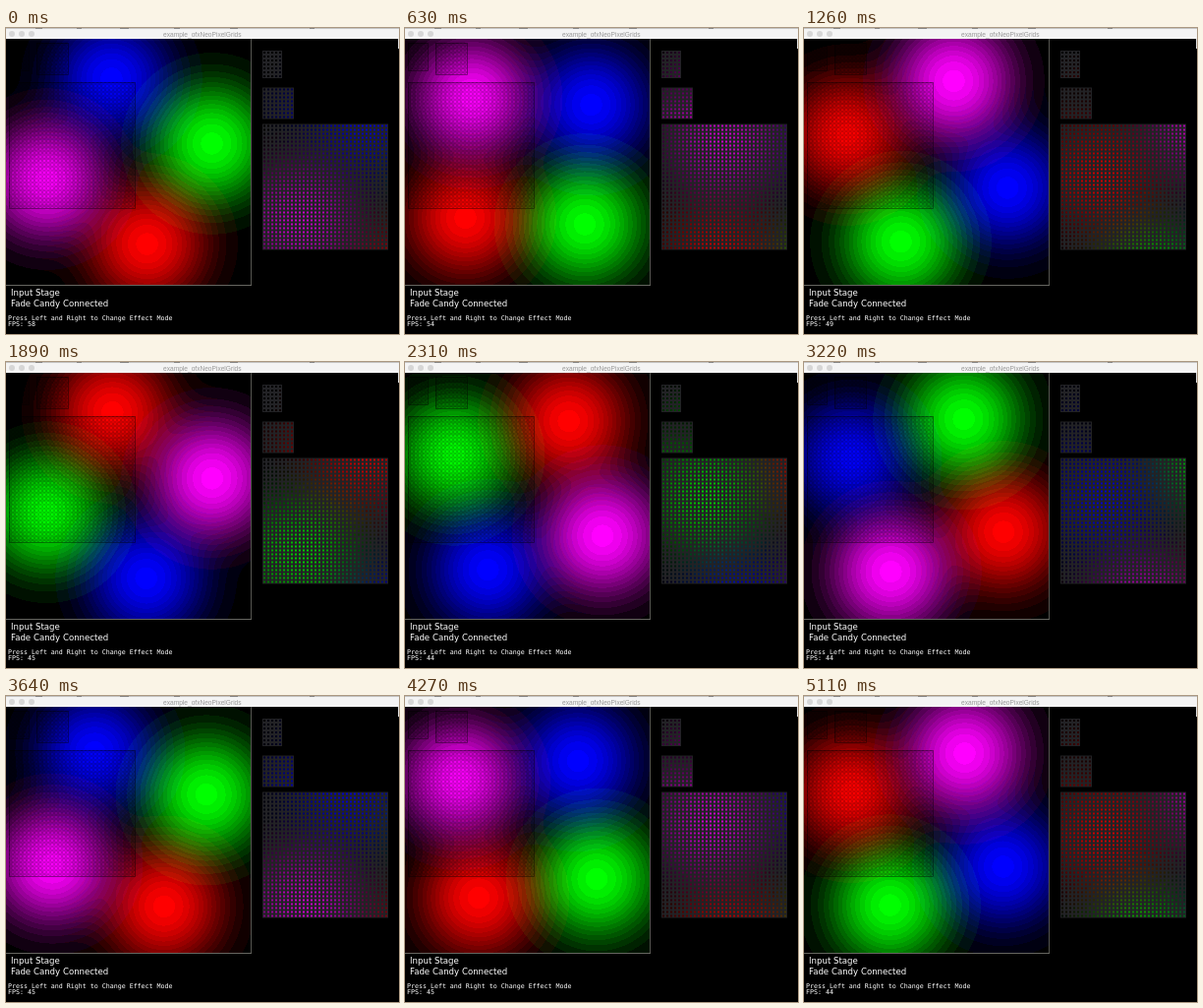
An HTML page with a canvas that plays this animation: 400 by 311 pixels, repeating every 5.18 s.

```html
<!DOCTYPE html>
<html lang="en">
<head>
<meta charset="utf-8">
<title>example_ofxNeoPixelGrids</title>
<style>
  html, body { margin: 0; width: 100%; height: 100%; overflow: hidden; background: #000; }
  canvas { display: block; }
</style>
</head>
<body>
<canvas id="view" width="400" height="311"></canvas>
<script>
const ctx = document.getElementById('view').getContext('2d');
const LOOP = 5180, STEP = 70;
const SIZE = 250, TOP = 11, CELL = 4;
const ORBIT = 86, REACH = 122, SPEED = 1.668, START = -0.212;
const LEVEL = 17;

// Colours in clockwise order, a quarter turn apart
const COLORS = [[0, 1, 0], [1, 0, 0], [1, 0, 1], [0, 0, 1]];

// Each grid samples the stage at (x, y) and is shown again at (px, py)
const GRIDS = [
  { x: 3, y: 15, px: 261, py: 23, cols: 5, rows: 7 },
  { x: 31, y: 15, px: 261, py: 60.5, cols: 8, rows: 8 },
  { x: 3, y: 55, px: 261, py: 97.5, cols: 32, rows: 32 }
];

const stage = ctx.createImageData(SIZE, SIZE);

function blobsAt(time) {
  return COLORS.map((color, i) => {
    const angle = START + SPEED * time / 1000 + i * Math.PI / 2;
    return { color, x: 125 + ORBIT * Math.cos(angle), y: 124 + ORBIT * Math.sin(angle) };
  });
}

// Coarse levels give the visible rings
const quantize = dark => Math.round((1 - dark) * 255 / LEVEL) * LEVEL;

function drawStage(time) {
  const blobs = blobsAt(time);
  const data = stage.data;
  for (let y = 0, p = 0; y < SIZE; y++) {
    for (let x = 0; x < SIZE; x++, p += 4) {
      let r = 1, g = 1, b = 1;
      for (const blob of blobs) {
        const d2 = (x - blob.x) ** 2 + (y - blob.y) ** 2;
        const glow = Math.max(0, 1 - d2 / (REACH * REACH)) ** 4;
        r *= 1 - blob.color[0] * glow;
        g *= 1 - blob.color[1] * glow;
        b *= 1 - blob.color[2] * glow;
      }
      data[p] = quantize(r);
      data[p + 1] = quantize(g);
      data[p + 2] = quantize(b);
      data[p + 3] = 255;
    }
  }
  ctx.putImageData(stage, 0, TOP);
  rect(249, TOP, 1, SIZE, '#555550');
  rect(0, 261, SIZE, 1, '#666660');
}

function rect(x, y, w, h, color) {
  ctx.fillStyle = color;
  ctx.fillRect(x, y, w, h);
}

function sample(x, y) {
  const p = ((y - TOP) * SIZE + x) * 4;
  const [r, g, b] = [0, 1, 2].map(i => Math.round(stage.data[p + i] * 0.78));
  return `rgb(${r},${g},${b})`;
}

function drawGrid({ x, y, px, py, cols, rows }) {
  const w = cols * CELL, h = rows * CELL;
  rect(px, py, w, h, '#222225');
  ctx.strokeStyle = 'rgba(0,0,0,.5)';
  ctx.lineWidth = 0.8;
  ctx.strokeRect(x + 0.5, y + 0.5, w, h);
  ctx.lineWidth = 0.5;
  ctx.beginPath();
  for (let row = 0; row < rows; row++) {
    for (let col = 0; col < cols; col++) {
      const dx = col * CELL, dy = row * CELL;
      rect(px + dx + 1, py + dy + 1, 2, 2, sample(x + dx + 2, y + dy + 2));
      ctx.moveTo(x + dx + 3.4, y + dy + 2);
      ctx.arc(x + dx + 2, y + dy + 2, 1.4, 0, 2 * Math.PI);
    }
  }
  ctx.stroke();
}

function text(label, x, y, font, color = '#fff', align = 'left') {
  ctx.font = font;
  ctx.fillStyle = color;
  ctx.textAlign = align;
  ctx.fillText(label, x, y);
}

function drawWindow() {
  rect(0, 0, 400, 311, '#000');
  rect(0, 0, 400, TOP, '#f4f4f4');
  rect(0, 0, 400, 1, '#c4c4c4');
  for (const [x, w] of [[30, 7], [72, 5], [116, 9], [171, 6], [228, 8], [309, 5]]) rect(x, 0, w, 1, '#888');
  rect(399, TOP, 1, 10, '#ddd');
  for (const x of [6, 16, 26]) {
    ctx.fillStyle = '#d6d6d6';
    ctx.beginPath();
    ctx.arc(x, 6, 3, 0, 2 * Math.PI);
    ctx.fill();
  }
  text('example_ofxNeoPixelGrids', 199.8, 9, '6.6px "Liberation Sans", sans-serif', '#999', 'center');
}

function fpsAt(time) {
  return time >= 3360 && time < 4600 ? 45 : Math.max(44, Math.round(58 - time / 140));
}

function draw(time) {
  drawWindow();
  drawStage(time);
  GRIDS.forEach(drawGrid);
  const sans = '8.6px "DejaVu Sans", sans-serif';
  const mono = '6.64px "DejaVu Sans Mono", monospace';
  text('Input Stage', 5, 272, sans);
  text('Fade Candy Connected', 5, 283, sans);
  text('Press Left and Right to Change Effect Mode', 2, 297, mono);
  text('FPS: ' + fpsAt(time), 2, 303, mono);
}

let shown = -1;
function tick() {
  const time = Math.floor(performance.now() % LOOP / STEP) * STEP;
  if (time !== shown) draw(shown = time);
  requestAnimationFrame(tick);
}
tick();
</script>
</body>
</html>
```
